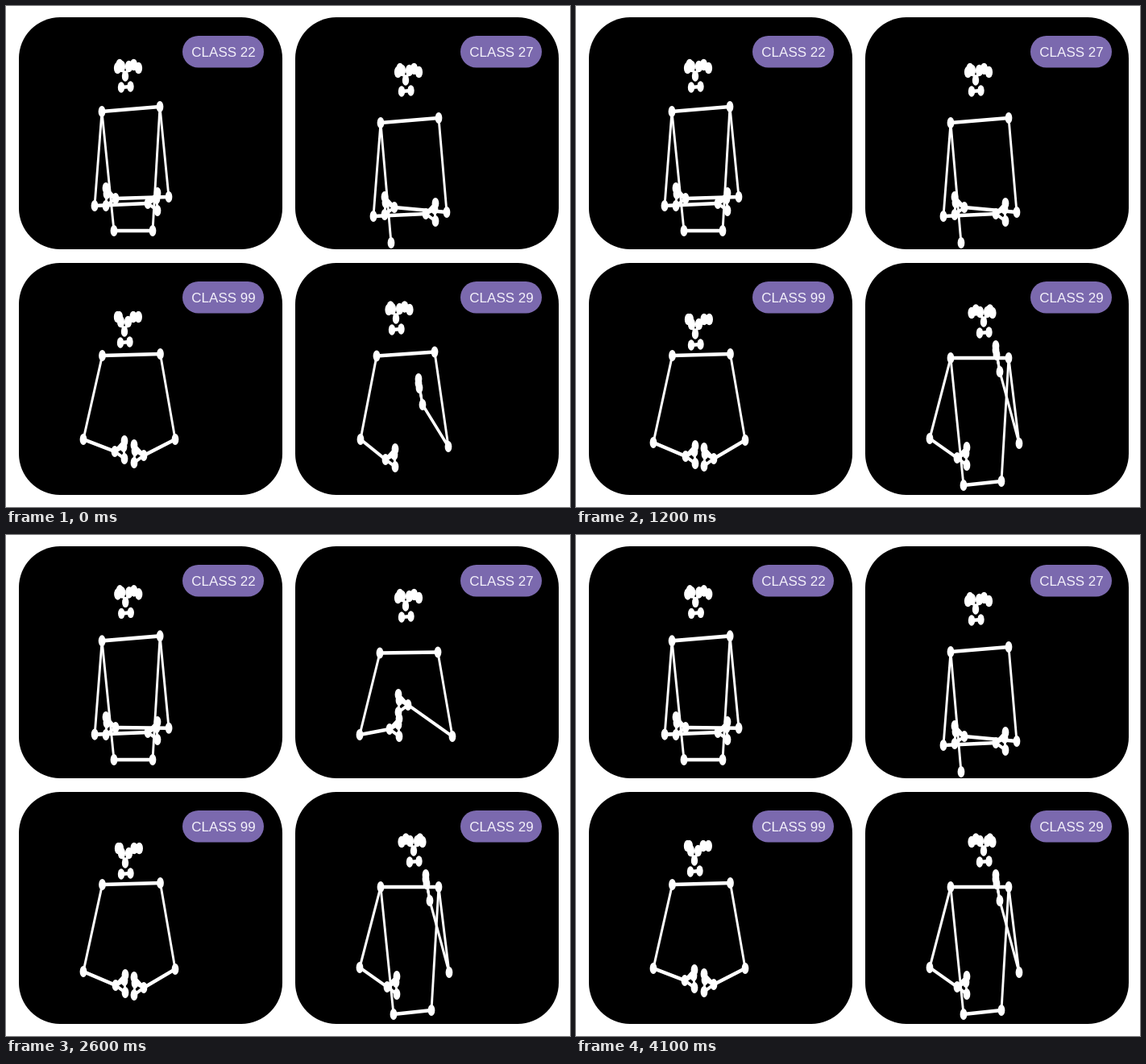
Animation of 700 by 622 pixels, one loop 4.2 s. Source, as an HTML page with a canvas:

```html
<!DOCTYPE html>
<html lang="en">
<head>
<meta charset="utf-8">
<title>Pose classes</title>
<style>
  html, body { margin: 0; width: 100%; height: 100%; overflow: hidden; background: #fff; }
  canvas { display: block; }
</style>
</head>
<body>
<canvas id="stage" width="700" height="622"></canvas>
<script>
const ctx = document.getElementById("stage").getContext("2d");
const LOOP = 4200, STEP = 100;
const STRETCH = 1.6;      // figures are taller than wide
const HALF_SHOULDER = 36;
const BEATS = [0, 400, 1200, 1700, 2600, 3500, 4100];

// Each figure moves between two poses; "sway" is the share of the second one at each beat.
// Pairs are [left, right]; "turn" is how far the head looks aside.
const makeFigure = (label, col, row, tilt, from, change, sway, hips) =>
  ({ label, col, row, tilt, from, to: { ...from, ...change }, sway, hips });

const figures = [
  makeFigure("CLASS 22", 0, 0, 0,
    { neck: [155, 128], slope: 3, elbows: [[110, 248], [202, 237]],
      wrists: [[176, 245], [136, 239]], nose: [148, 87], turn: 1.75 },
    { neck: [157, 129], elbows: [[112, 247], [203, 244]], nose: [152, 78] },
    [0, 0.7, 0, 0, 0.4, 1, 0.4],
    w => w < 0.55 ? [[134, 279], [182, 279]] : [[134, 281]]),

  makeFigure("CLASS 27", 1, 0, 0,
    { neck: [501, 142], slope: 3, elbows: [[456, 261], [547, 256]],
      wrists: [[521, 258], [482, 250]], nose: [496, 92], turn: 1.75 },
    { neck: [500, 146], slope: 0.5, elbows: [[439, 248], [554, 250]],
      wrists: [[476, 241], [499, 211]], nose: [496, 88] },
    [0, 0, 0, 0.65, 1, 1, 0],
    w => w < 0.5 ? [[478, 294]] : []),

  makeFigure("CLASS 99", 0, 1, 4,
    { neck: [155.5, 433], slope: 1, elbows: [[96, 538], [210, 538]],
      wrists: [[135, 553], [171, 558]], nose: [147, 404], turn: 2.2 },
    { elbows: [[96, 542], [210, 539]], wrists: [[136, 559], [171, 562]], nose: [148, 407] },
    [0, 0.6, 1, 0.6, 1, 0, 0],
    () => []),

  makeFigure("CLASS 29", 1, 1, 0.5,
    { neck: [496, 432], slope: 2.5, elbows: [[440, 538], [549, 547]],
      wrists: [[471, 563], [517, 495]], nose: [484, 388], turn: 2 },
    { neck: [501, 437], slope: 0, elbows: [[439, 537], [550, 543]],
      wrists: [[473, 561], [526, 454]], nose: [506, 392], turn: -1 },
    [0, 0.9, 1, 0.65, 1, 0.95, 1],
    w => w > 0.98 ? [[481, 595], [528, 590]] : [])
];

const lerp = (a, b, u) => a + (b - a) * u;
const smooth = u => u * u * (3 - 2 * u);
const offset = ([x, y], dx, dy) => [x + dx, y + dy];

function swayAt(values, t) {
  const next = BEATS.findIndex(beat => beat > t);
  if (next < 0) return values[values.length - 1];
  const u = (t - BEATS[next - 1]) / (BEATS[next] - BEATS[next - 1]);
  return lerp(values[next - 1], values[next], smooth(u));
}

// Vertical motion leads, sideways motion follows.
function blend({ from, to }, w) {
  const late = w ** 3;
  const point = (a, b) => [lerp(a[0], b[0], late), lerp(a[1], b[1], w)];
  const pair = name => from[name].map((p, i) => point(p, to[name][i]));
  return {
    neck: point(from.neck, to.neck),
    nose: point(from.nose, to.nose),
    elbows: pair("elbows"),
    wrists: pair("wrists"),
    slope: lerp(from.slope, to.slope, w),
    turn: lerp(from.turn, to.turn, late)
  };
}

function line(...points) {
  ctx.beginPath();
  points.forEach(([x, y]) => ctx.lineTo(x, y / STRETCH));
  ctx.stroke();
}

function dots(points, r = 4.4) {
  for (const [x, y] of points) {
    ctx.beginPath();
    ctx.arc(x, y / STRETCH, r, 0, Math.PI * 2);
    ctx.fill();
  }
}

// A steep forearm holds the hand upright; otherwise the fingers fan inwards.
function drawHand(elbow, wrist, side) {
  const upright = Math.abs(wrist[1] - elbow[1]) > Math.abs(wrist[0] - elbow[0]);
  const fan = upright ? [[5, -32], [5, -27], [4, -21]] : [[12, -13], [11, -6], [12, 9]];
  const fingers = fan.map(([dx, dy]) => offset(wrist, dx * side, dy));
  fingers.forEach(tip => line(wrist, tip));
  line(...fingers);
  dots([wrist, ...fingers]);
}

function drawFace(nose, turn, tilt) {
  for (const side of [-1, 1]) {
    const gap = 4.25 + side * turn;
    const brow = [-12, -14, -10].map((dy, i) =>
      offset(nose, side * (4.5 + i * gap), dy - i * tilt));
    line(nose, ...brow);
    dots(brow, 4.6);
  }
  const mouth = [offset(nose, -5, 14), offset(nose, 6.5, 13)];
  line(...mouth);
  dots([...mouth, nose], 4.2);
}

function drawFigure(figure, w) {
  const { neck, slope, elbows, wrists, nose, turn } = blend(figure, w);
  const shoulders = [-1, 1].map(side => offset(neck, side * HALF_SHOULDER, -side * slope));
  const hips = figure.hips(w);

  ctx.save();
  ctx.scale(1, STRETCH);
  ctx.strokeStyle = ctx.fillStyle = "#fff";
  ctx.lineWidth = 2.9;
  ctx.lineJoin = "round";
  line(...shoulders);
  line(...hips);
  hips.forEach((hip, i) => line(shoulders[i], hip));
  elbows.forEach((elbow, i) => {
    line(shoulders[i], elbow, wrists[i]);
    drawHand(elbow, wrists[i], i ? -1 : 1);
  });
  dots([...shoulders, ...elbows, ...hips]);
  drawFace(nose, turn, figure.tilt);
  ctx.restore();
}

function fillRound(x, y, w, h, r, color) {
  ctx.beginPath();
  ctx.roundRect(x, y, w, h, r);
  ctx.fillStyle = color;
  ctx.fill();
}

function drawPanel(figure, t) {
  const x = 16 + figure.col * 343, y = 14 + figure.row * 305;
  const badge = 219 + figure.col * 345;
  ctx.save();
  fillRound(x, y, 327, 288, 51, "#000");
  ctx.clip();
  drawFigure(figure, swayAt(figure.sway, t));
  ctx.restore();

  fillRound(badge, y + 23, 101, 39.5, 19.75, "#7b69ae");
  ctx.fillStyle = "#f3f0fa";
  ctx.font = '17px "Liberation Sans", Arial, sans-serif';
  ctx.textAlign = "center";
  ctx.fillText(figure.label, badge + 51, y + 49);
}

function render() {
  const t = Math.floor(performance.now() % LOOP / STEP) * STEP;
  ctx.fillStyle = "#fff";
  ctx.fillRect(0, 0, 700, 622);
  figures.forEach(figure => drawPanel(figure, t));
  requestAnimationFrame(render);
}
render();
</script>
</body>
</html>
```
